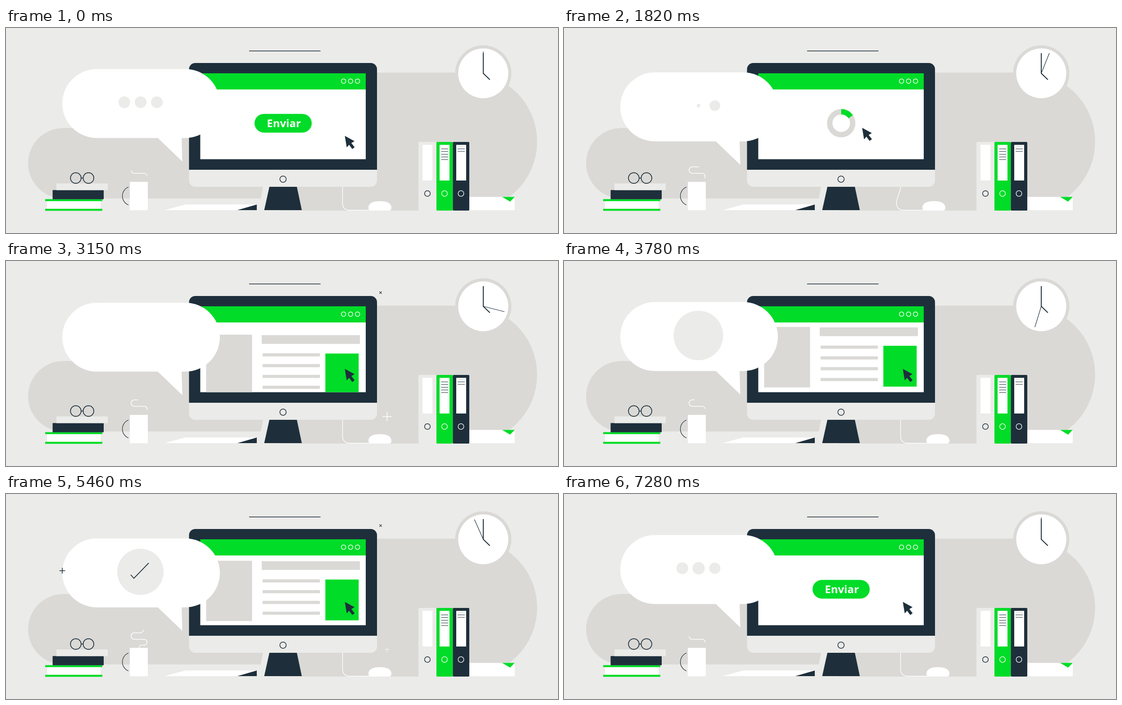
Animation, 1226 px wide and 457 px high, one loop 7350 ms. Source, as an HTML page:

```html
<!DOCTYPE html>
<html lang="es">
<head>
<meta charset="utf-8">
<title>Enviar</title>
<style>
html, body { margin: 0; width: 100%; height: 100%; overflow: hidden; background: #ebebe9; }
svg { display: block; width: 100%; height: 100%; }
.dark { fill: #1e2f3b; }
.green { fill: #00dc28; }
.grey { fill: #dad9d6; }
.light { fill: #ebebe9; }
.white { fill: #fff; }
.ink { fill: none; stroke: #1e2f3b; }
.chalk { fill: none; stroke: #fff; }
text { font: 700 24px "Open Sans", "Noto Sans", sans-serif; text-anchor: middle; }
</style>
</head>
<body>
<svg viewBox="0 0 1226 457" preserveAspectRatio="none">
  <defs>
    <clipPath id="screen"><rect x="431.5" y="137" width="367.5" height="155.5"/></clipPath>
    <clipPath id="pill"><rect x="125" y="91.5" width="350" height="153.7" rx="76.8"/></clipPath>
  </defs>

  <!-- backdrop -->
  <rect class="light" width="1226" height="457"/>
  <path class="grey" d="M600 99.5H1026A153.7 153.7 0 0 1 1026 407H600Z"/>
  <path class="grey" d="M571 223H127.5A78.5 78.5 0 0 0 127.5 380H566L571 354Z"/>
  <path class="light" d="M571 354H610V407H561Z"/>
  <path class="ink" stroke-width="1.4" d="M540 51.3H698.5"/>

  <!-- clock -->
  <circle class="grey" cx="1060" cy="101" r="62.5"/>
  <circle class="white" cx="1060" cy="101" r="55.6"/>
  <path class="ink" stroke-width="2" d="M1060 56V101L1074.7 115.3"/>
  <path id="second" class="ink" stroke-width="1.2" d="M1060 101V52.5"/>

  <!-- books and glasses -->
  <rect class="white" x="91" y="385" width="119" height="19"/>
  <rect class="green" x="87" y="381.5" width="127" height="4.5" rx="1"/>
  <rect class="green" x="87" y="403" width="127" height="4.5" rx="1"/>
  <rect class="dark" x="103.5" y="361.3" width="113.5" height="20.4" rx="1"/>
  <rect class="light" x="112" y="346.5" width="114" height="15"/>
  <g class="ink" stroke-width="1.7">
    <circle cx="155" cy="334.5" r="11.8"/>
    <circle cx="183.2" cy="334.5" r="11.8"/>
    <path d="M167 334.5H171.4"/>
  </g>

  <!-- mug -->
  <rect class="white" x="275" y="343" width="40" height="63.3"/>
  <path class="ink" stroke-width="1.2" d="M272 354.5C254 362 254 387 272 394.5"/>
  <path id="steam" class="chalk" stroke-width="1.5" pathLength="1"
    d="M295.5 343Q296 337 302 337H307A6.5 6.5 0 0 0 307 324H285A7.2 7.2 0 0 1 285 309.5H298Q304.5 309 305 303"/>

  <!-- paper -->
  <path class="white" d="M352 406L398 393.5H557L514 406Z"/>
  <path class="dark" d="M514 406L557 393.5V406Z"/>

  <!-- mouse -->
  <path id="cord" class="chalk" stroke-width="1.4"/>
  <path id="mouse" class="white" d="M805 401C805 390 816 386 830.5 386S856 390 856 401Q856 407 850 407H811Q805 407 805 401Z"/>

  <!-- binders -->
  <rect class="light" x="916" y="254" width="40" height="153" rx="2"/>
  <rect class="green" x="956" y="254" width="36.7" height="153" rx="2"/>
  <rect class="dark" x="992.5" y="254" width="36.5" height="153" rx="2"/>
  <path class="white" d="M925 260.5h22v79.5h-22zM963 260.5h22v79.5h-22zM1000 260.5h22v79.5h-22z"/>
  <path class="ink" stroke-width="1" d="M966.5 269.5h15.5m-15.5 6h15.5m-15.5 6h15.5m-15.5 6h15.5m-15.5 5.8h15.5M1003 269.5h16m-16 5.5h16"/>
  <path class="light" d="M1003 263h16v2.5h-16z"/>
  <circle class="ink" stroke-width="1.5" cx="936" cy="369" r="6.3"/>
  <circle class="chalk" stroke-width="1.3" cx="974" cy="369" r="6.3"/>
  <circle class="chalk" stroke-width="1.3" cx="1010.5" cy="369" r="6.3"/>
  <rect class="white" x="1029" y="376.5" width="101" height="29.8"/>
  <path class="green" d="M1102 376.5H1130L1119.5 387Z"/>

  <!-- monitor -->
  <path class="dark" d="M585 354H646L657 406H573.5Z"/>
  <path class="dark" d="M406.5 316V92A14 14 0 0 1 420.5 78H810A14 14 0 0 1 824 92V316Z"/>
  <path class="light" d="M406.5 316H824V340A14 14 0 0 1 810 354H420.5A14 14 0 0 1 406.5 340Z"/>
  <circle class="ink" stroke-width="1.6" cx="615.3" cy="337" r="7"/>
  <rect class="green" x="431.5" y="101" width="367.5" height="36"/>
  <g class="chalk" stroke-width="1.4">
    <circle cx="749.7" cy="118.5" r="5"/>
    <circle cx="765.3" cy="118.5" r="5"/>
    <circle cx="780.7" cy="118.5" r="5"/>
  </g>
  <rect class="white" x="431.5" y="137" width="367.5" height="155.5"/>
  <g clip-path="url(#screen)">
    <g id="button">
      <rect class="green" x="552" y="191.5" width="127" height="41.7" rx="20.8"/>
      <text class="white" x="617" y="221">Enviar</text>
    </g>
    <g id="loader" fill="none" stroke-width="12">
      <circle cx="615.7" cy="212.2" r="25.5" stroke="#dad9d6"/>
      <circle id="ring" cx="615.7" cy="212.2" r="25.5" stroke="#00dc28" pathLength="1" transform="rotate(-90 615.7 212.2)"/>
    </g>
    <g id="page">
      <path class="grey" d="M444.5 147h102v134.7h-102zM568 148h218v19.5h-218zM570 188.5h127v7h-127zM570 212.5h127v7h-127zM570 236.5h127v7h-127zM570 260.7h127v7h-127z"/>
      <rect class="green" x="709.3" y="189" width="74" height="91"/>
    </g>
  </g>
  <path id="cursor" class="dark" d="M752.5 240.5L774 252.3L767 256.5L774.3 265.7L769 269.7L762 260.3L756.8 266.3Z"/>

  <!-- speech bubble -->
  <g id="bubble">
    <rect class="white" x="125" y="91.5" width="350" height="153.7" rx="76.8"/>
    <path class="white" d="M336 244H390L391.5 297.5Z"/>
    <g class="light">
      <circle class="dot" cx="262.7" cy="165.5" r="13"/>
      <circle class="dot" cx="299" cy="165.5" r="13"/>
      <circle class="dot" cx="335" cy="165.5" r="13"/>
    </g>
    <g clip-path="url(#pill)">
      <g id="letter">
        <rect class="light" x="246" y="137.5" width="120" height="74"/>
        <path class="ink" stroke-width="1.8" d="M246 137.5L299 186Q306 193 313 186L366 137.5"/>
        <path class="ink" stroke-width="1.3" d="M246 211.5L281.5 180M366 211.5L330.5 180"/>
        <path class="ink" stroke-width="1.9" d="M377 165H420M352 181.4H378.5M384.5 181.4H390"/>
      </g>
    </g>
    <circle id="badge" class="light" cx="298.5" cy="166" r="51.5"/>
    <path id="check" class="ink" stroke-width="1.8" pathLength="1" d="M277 172.5L284 180.5L317 146.5"/>
  </g>

  <!-- sparkles -->
  <path id="plus" class="ink" stroke-width="1.6" d="M118.5 171H131.5M125 164.5V177.5"/>
  <path id="cross" class="ink" stroke-width="1.2" d="M829.3 67.8L834.7 73.2M834.7 67.8L829.3 73.2"/>
  <path id="star" class="chalk" stroke-width="1.6" d="M836 346.7H857M846.5 336.2V357.2"/>
</svg>

<script>
const LOOP = 7350, STEP = 70;
const $ = id => document.getElementById(id);
const dots = [...document.querySelectorAll('.dot')];

const clamp = x => Math.min(1, Math.max(0, x));
const span = (t, start, length) => clamp((t - start) / length);
const inOut = p => p < 0.5 ? 4 * p ** 3 : 1 - 4 * (1 - p) ** 3;
const ease = (t, start, length) => inOut(span(t, start, length));
const back = (p, c) => p <= 0 ? 0 : 1 + (c + 1) * (p - 1) ** 3 + c * (p - 1) ** 2;

// Grows, holds and shrinks again.
const pulse = (t, start, length, edge = 260) =>
  Math.min(ease(t, start - 60, edge + 60), 1 - ease(t, start + length - edge, edge));

// Symmetric cubic Bezier timing with handles at 0.7 and 0.3.
function sweep(x) {
  let lo = 0, hi = 1;
  for (let i = 0; i < 24; i++) {
    const s = (lo + hi) / 2;
    if (2.1 * s - 3.3 * s * s + 2.2 * s ** 3 < x) lo = s; else hi = s;
  }
  return 3 * lo * lo - 2 * lo ** 3;
}

function along(keys, t) {
  const i = Math.max(1, keys.findIndex(k => k[0] >= t));
  const [t0, a] = keys[i - 1], [t1, b] = keys[i];
  return a + (b - a) * (t - t0) / (t1 - t0);
}

const steamTail = [[0, .25], [980, .45], [2450, 0], [3150, .22], [3780, .25], [5460, 0], [7350, .25]];
const steamHead = [[0, .65], [980, .8], [2450, 1], [3150, .85], [3780, .82], [5460, 1], [7350, .65]];

const move = (el, x, y) => el.setAttribute('transform', `translate(${x} ${y})`);
const show = (el, on) => el.setAttribute('visibility', on ? 'visible' : 'hidden');

function scale(el, cx, cy, k) {
  show(el, k > 0.02);
  el.setAttribute('transform', `translate(${cx} ${cy}) scale(${k}) translate(${-cx} ${-cy})`);
}

function trim(el, from, to) {
  show(el, to - from > 0.002);
  el.setAttribute('stroke-dasharray', `0 ${from} ${to - from} 2`);
}

function drawBubble(t) {
  move($('bubble'), 0, 3.75 * (1 - Math.cos(4 * Math.PI * t / LOOP)));

  dots.forEach((dot, i) => {
    const p = t - 58 * i, early = t < 4000;
    const y = p > 0 && p < 1648 ? 7 * Math.sin(2 * Math.PI * p / 824) : 0;
    const k = early ? 1 - ease(p, 1648, 200) : back(span(t, 7028 + 70 * i, 280), 1.2);
    show(dot, k > 0.02);
    dot.setAttribute('cy', 165.5 + y);
    dot.setAttribute('r', 13 * Math.max(0, k));
  });

  show($('letter'), t > 1900 && t < 3080);
  move($('letter'), 240 * (1 - ease(t, 1900, 500)) - 320 * ease(t, 2560, 500), 0);

  const leave = 1 - ease(t, 6350, 350);
  scale($('badge'), 298.5, 166, back(span(t, 3524, 420), 1.4) * leave);
  scale($('check'), 298.5, 166, leave);
  trim($('check'), 0, ease(t, 3950, 400));
  if (leave < 0.02) show($('check'), false);
}

function drawScreen(t) {
  const press = 0.05 * pulse(t, 1180, 260, 120);
  const button = t < 4000 ? 1 - press - ease(t, 1460, 200) : back(span(t, 6250, 380), 1.2);
  scale($('button'), 615.5, 212.3, Math.max(0, button));

  scale($('loader'), 615.7, 212.2, ease(t, 1600, 200) * (1 - ease(t, 2540, 220)));
  trim($('ring'), 0, span(t, 1700, 778));

  const off = 160 * (1 - ease(t, 2590, 800) + ease(t, 5350, 800));
  show($('page'), off < 159.9);
  move($('page'), 0, off);

  const reach = ease(t, 790, 280) - ease(t, 1680, 520);
  move($('cursor'), -98 * reach, -19.6 * reach);
  const d = -9.8 * reach, x = 747.5 + d;
  move($('mouse'), d, 0);
  $('cord').setAttribute('d', `M747.5 354C747.5 366 ${x} 378 ${x} 390Q${x} 406.3 ${x + 17} 406.3H${x + 60}`);
}

function draw(t) {
  drawBubble(t);
  drawScreen(t);
  $('second').setAttribute('transform', `rotate(${360 * sweep(t / LOOP)} 1060 101)`);
  trim($('steam'), along(steamTail, t), along(steamHead, t));
  scale($('plus'), 125, 171, Math.max(pulse(t, 620, 780), pulse(t, 5250, 780)));
  scale($('cross'), 832, 70.5, Math.max(pulse(t, 660, 640, 200), pulse(t, 2880, 640, 200), pulse(t, 5180, 640, 200)));
  scale($('star'), 846.5, 346.7, Math.max(pulse(t, 640, 700), pulse(t, 2930, 700), pulse(t, 4880, 710)));
}

const start = performance.now();
function frame() {
  const t = (performance.now() - start) % LOOP;
  draw(Math.floor(t / STEP) * STEP);
  requestAnimationFrame(frame);
}
frame();
</script>
</body>
</html>
```
